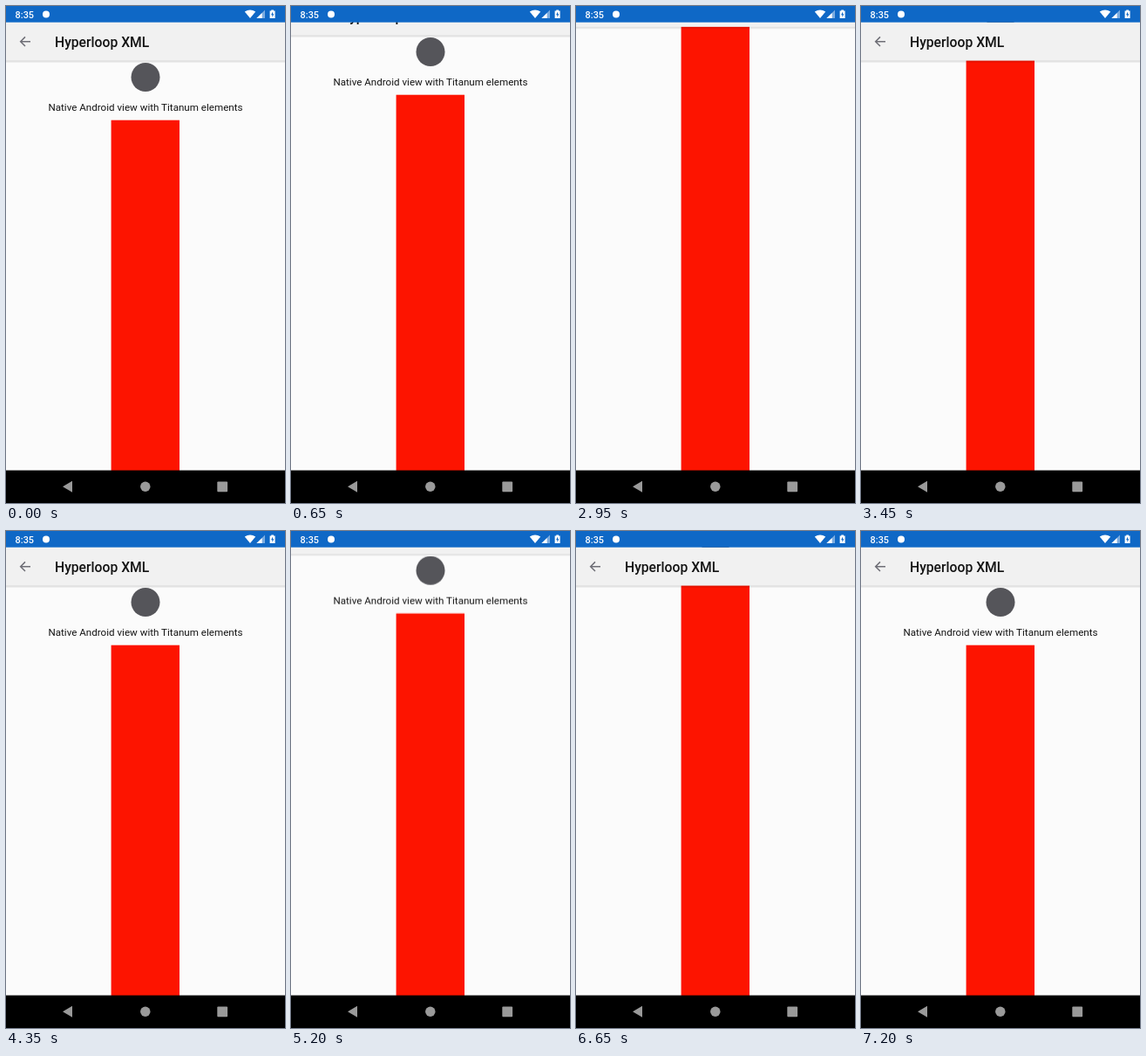
These frames come from a looping animation (320 px wide and 569 px high, 8000 ms). An HTML page:

```html
<!DOCTYPE html>
<html lang="en">
<head>
<meta charset="utf-8">
<title>Hyperloop XML</title>
<style>
  html, body { margin: 0; width: 100%; height: 100%; overflow: hidden; background: #fbfbfb; }
  svg { display: block; width: 100%; height: 100%; }
  text { font-family: Roboto, "Noto Sans", sans-serif; fill: #141414; }
  .medium { font-weight: 500; }
  .status text { fill: #fff; }

  /* The toolbar collapses first, then the content scrolls; both hold each 50 ms step. */
  .slide { animation: slide 8s infinite; }
  .scroll { animation: scroll 8s infinite; }
  .shadow { animation: shadow 8s step-end infinite; }

  @keyframes slide {
    0% { transform: translateY(0); }
    6.25% { transform: translateY(0); animation-timing-function: steps(4, start); }
    8.75% { transform: translateY(-29px); animation-timing-function: steps(2, start); }
    10% { transform: translateY(-43.6px); }
    36.875% { transform: translateY(-43.6px); animation-timing-function: steps(1, start); }
    37.5% { transform: translateY(-38.6px); animation-timing-function: steps(10, start); }
    43.75% { transform: translateY(0); }
    62.5% { transform: translateY(0); animation-timing-function: steps(6, start); }
    66.25% { transform: translateY(-43.6px); }
    81.25% { transform: translateY(-43.6px); animation-timing-function: steps(4, start); }
    83.75%, 100% { transform: translateY(0); }
  }

  @keyframes scroll {
    0% { transform: translateY(0); }
    10% { transform: translateY(0); animation-timing-function: steps(11, start); }
    16.875% { transform: translateY(-64.4px); animation-timing-function: steps(1, start); }
    17.5% { transform: translateY(-68.4px); }
    50% { transform: translateY(-68.4px); animation-timing-function: steps(8, start); }
    55% { transform: translateY(0); }
    66.25% { transform: translateY(0); animation-timing-function: steps(10, start); }
    72.5% { transform: translateY(-68.4px); }
    85% { transform: translateY(-68.4px); animation-timing-function: steps(9, start); }
    90.625%, 100% { transform: translateY(0); }
  }

  /* A fully collapsed toolbar casts no shadow. */
  @keyframes shadow {
    0%, 36.875%, 81.25%, 100% { opacity: 1; }
    9.375%, 65.625% { opacity: 0; }
  }
</style>
</head>
<body>
<svg viewBox="0 0 320 569">
  <defs>
    <linearGradient id="shade" x2="0" y2="1">
      <stop stop-color="#000" stop-opacity=".16"/>
      <stop offset="1" stop-color="#000" stop-opacity="0"/>
    </linearGradient>
  </defs>
  <rect width="320" height="569" fill="#fbfbfb"/>

  <g class="slide">
    <g class="scroll">
      <circle cx="160" cy="81.5" r="16.5" fill="#55555a"/>
      <text x="160" y="120.4" font-size="11.62" text-anchor="middle">Native Android view with Titanum elements</text>
      <rect x="120.6" y="130.7" width="78.4" height="600" fill="#fd1400"/>
    </g>
    <g class="toolbar">
      <rect class="shadow" y="62.3" width="320" height="3.2" fill="url(#shade)"/>
      <rect y="18.7" width="320" height="43.6" fill="#f1f1f1"/>
      <path d="M28 40.7H17M22 35.4l-5.3 5.3 5.3 5.3" fill="none" stroke="#6e6e76" stroke-width="1.5"/>
      <text class="medium" x="56" y="46.9" font-size="15.7">Hyperloop XML</text>
    </g>
  </g>

  <g class="status" fill="#fff">
    <rect width="320" height="18.7" fill="#0f68c6"/>
    <text class="medium" x="10.6" y="13.6" font-size="10.9">8:35</text>
    <circle cx="46" cy="9.5" r="4"/>
    <path d="M280 14l-6.2-7.4q6.2-4.2 12.4 0z"/>
    <path d="M297 4.6V14h-9.6z" opacity=".45"/>
    <path d="M293.6 7.9V14h-6.2z"/>
    <path d="M304.2 5.4V4.4h2.8v1h1.6V14h-6V5.4z"/>
    <path d="M306 6.6l-2 3.6h1.4v2.6l2-3.6H306z" fill="#0f68c6"/>
  </g>

  <g class="nav" fill="#9a9a9a">
    <rect y="531.6" width="320" height="37.4" fill="#000"/>
    <path d="M65 550.3l11-6.5v13z"/>
    <circle cx="159.8" cy="550.3" r="5.7"/>
    <rect x="242.3" y="544.4" width="11.8" height="11.8" rx="1"/>
  </g>
</svg>
</body>
</html>
```
